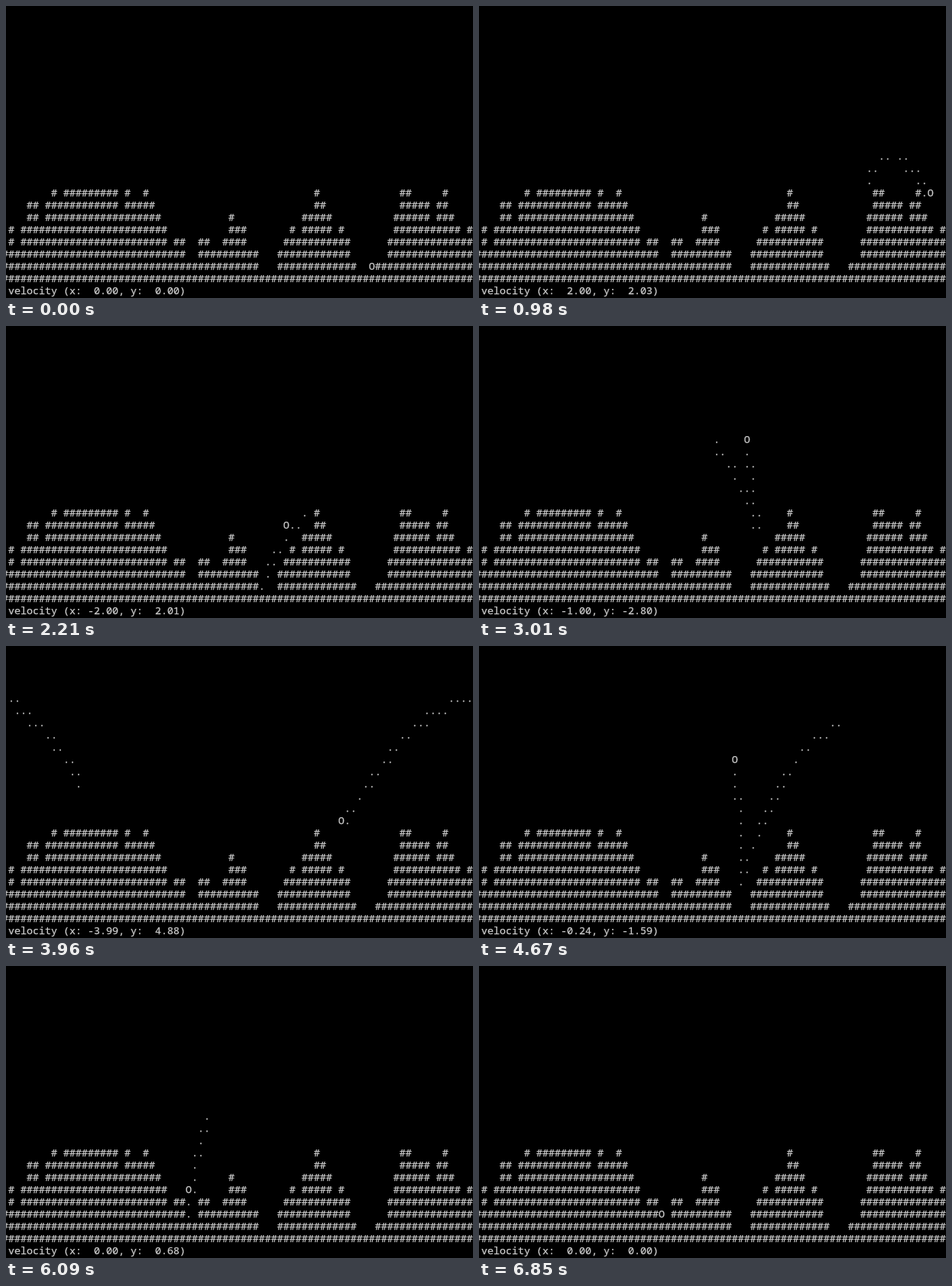
Animation of 611 by 382 pixels, one loop 7450 ms. Source, as an HTML page:

```html
<!DOCTYPE html>
<html lang="en">
<head>
<meta charset="utf-8">
<title>Bouncing ball</title>
<style>
  html, body { margin: 0; width: 100%; height: 100%; overflow: hidden; background: #000; }
  svg { display: block; }
  text {
    font: 13.3333px "Noto Sans Mono", "DejaVu Sans Mono", monospace;
    fill: #ccc;
    stroke: #ccc;
    stroke-width: 0.25px;
    white-space: pre;
  }
</style>
</head>
<body>
<svg id="stage" width="611" height="382" viewBox="0 0 611 382"></svg>
<script>
const LOOP = 7450, START = 610, LEAD = 11, STEP_MS = 47.27, LAST_STEP = 132;
const COLS = 77, ROWS = 23, GRAVITY = 0.68;

// Hills: first column, first row, lines
const HILLS = [
  [0, 15, [
    '        # ######### #  #',
    '    ## ############ #####',
    '    ## ###################',
    ' # ########################',
    ' # ######################## ##',
    '#'.repeat(30),
    '#'.repeat(42),
    '#'.repeat(COLS)]],
  [32, 17, [
    '     #',
    '     ###',
    '##  ####',
    '##########']],
  [45, 15, [
    '      #',
    '      ##',
    '    #####',
    '  # ##### #',
    ' ###########',
    '############',
    '#############']],
  [61, 15, [
    '    ##     #',
    '    ##### ##',
    '   ###### ###',
    '   ########### #',
    '  ' + '#'.repeat(14),
    '  ' + '#'.repeat(14),
    '#'.repeat(16)]]
];

// Bounces and key presses as step, x, y; the ball falls freely in between
const TURNS = [
  [0, 59, 21], [1, 59, 18.12], [9, 75, 18.04], [19, 95.3, 14.9], [28, 125.5, 15.8],
  [31.2, 118.7, 21.4], [33.2, 124.3, 16.1], [34, 122.5, 16.9], [35.8, 118.9, 21.62],
  [43, 115.4, 10.2], [45.5, 119.2, 13], [48.6, 122.8, 18.28], [57, 114.4, 5.04],
  [61, 92.5, 14.9], [65.5, 76.5, 4.5], [71, 54.5, 14.9], [71.2, 53.702, 15.89],
  [76.5, 59.5, 6.6], [82.5, 42.5, 19.2], [92, 40.2, 12.2], [94.8, 44.9, 19],
  [98, 41.9, 9.2], [101, 38.4, 10.5], [103.2, 36.2, 16.81], [112, 29.5, 20.9]
];
// Ever shorter hops on the spot until it rests
for (let hop = 6, step = 112; hop > 1; hop--) TURNS.push([step += hop, 29.5, 20.9]);

const land = Array.from({ length: ROWS }, () => Array(COLS).fill(' '));
for (const [col, row, lines] of HILLS) {
  lines.forEach((line, r) => [...line].forEach((ch, c) => {
    if (ch === '#') land[row + r][col + c] = ch;
  }));
}

const stage = document.getElementById('stage');
function addLine(x, row) {
  const line = document.createElementNS('http://www.w3.org/2000/svg', 'text');
  line.setAttribute('x', x);
  line.setAttribute('y', 16 * row + 9);
  stage.append(line);
  return line;
}
const lines = land.map((_, row) => addLine(-5, row));
const status = addLine(3, ROWS);

function ballAt(step) {
  let i = TURNS.length - 2;
  while (i > 0 && TURNS[i][0] > step) i--;
  const [s0, x0, y0] = TURNS[i], [s1, x1, y1] = TURNS[i + 1];
  const span = s1 - s0, s = step - s0;
  const vx = (x1 - x0) / span;
  const vy = (y1 - y0) / span - GRAVITY * span / 2;
  return { x: x0 + vx * s, y: y0 + vy * s + GRAVITY * s * s / 2, vx, vy: vy + GRAVITY * s };
}

// The epsilon keeps whole columns from falling to the one before
function put(grid, { x, y }, ch) {
  const row = Math.floor(y + 1e-6);
  const col = (Math.floor(x + 1e-6) + 1 + COLS) % COLS;
  if (grid[row] && grid[row][col] !== '#') grid[row][col] = ch;
}

function drawTrail(grid, step) {
  const length = Math.floor(Math.min(9, Math.max(5, step / 5)));
  for (let s = Math.max(0, step - length); s < step; s++) {
    const a = ballAt(s), b = ballAt(s + 1);
    const dots = Math.ceil(2 * Math.max(Math.abs(b.x - a.x), Math.abs(b.y - a.y)));
    for (let i = 0; i < dots; i++) {
      const dot = ballAt(s + i / dots);
      if (Math.abs(dot.vy) > 0.2) put(grid, dot, '.');
    }
  }
}

const format = v => (Math.abs(v) < 0.005 ? 0 : v).toFixed(2).padStart(5);

function draw(time) {
  const elapsed = Math.floor((time - START + LEAD) / STEP_MS);
  const step = time < START ? 0 : Math.min(elapsed, LAST_STEP);
  const resting = time < START || step === LAST_STEP;
  const grid = land.map(row => row.slice());
  const ball = ballAt(step);
  if (!resting) drawTrail(grid, step);
  put(grid, ball, 'O');
  lines.forEach((line, row) => { line.textContent = grid[row].join(''); });
  const [vx, vy] = resting ? [0, 0] : [ball.vx, ball.vy];
  status.textContent = `velocity (x: ${format(vx)}, y: ${format(vy)})`;
}

const begin = performance.now();
function tick() {
  draw((performance.now() - begin) % LOOP);
  requestAnimationFrame(tick);
}
tick();
</script>
</body>
</html>
```
